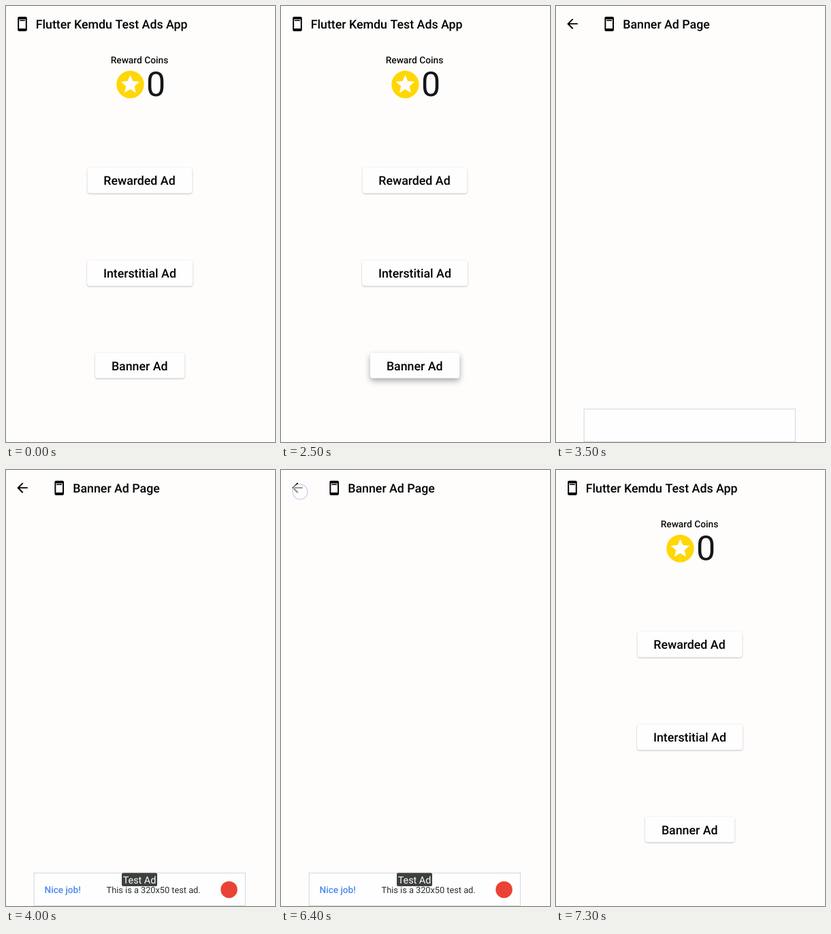
These frames come from a looping animation (395 by 639 pixels, 7700 ms). An HTML page:

```html
<!DOCTYPE html>
<html lang="en">
<head>
<meta charset="utf-8">
<title>Test Ads App</title>
<style>
  html, body { margin: 0; width: 100%; height: 100%; overflow: hidden; background: #fefdfc; }
  svg { display: block; width: 100vw; height: 100vh; font-family: Roboto, sans-serif; text-rendering: geometricPrecision; }
  .bg { fill: #fefdfc; }
  .title, .button text { font-size: 17.75px; font-weight: 500; fill: #000; }
  .button text, .center { text-anchor: middle; }
  .end { text-anchor: end; }
  .button rect {
    fill: #fffefe;
    filter: drop-shadow(0 1px 1px rgba(0, 0, 0, .22)) drop-shadow(0 0 1px rgba(0, 0, 0, .05));
  }
  .coins { font-size: 13.75px; font-weight: 500; fill: #0c0d0e; }
  .count { font-size: 50px; fill: #151618; }

  .press, .page, .ad, .creative, .ripple { animation: 7700ms step-end infinite; }

  .button .press { animation-name: press; }
  @keyframes press {
    29.87% { filter: drop-shadow(0 2px 2px rgba(0, 0, 0, .26)) drop-shadow(0 0 1px rgba(0, 0, 0, .05)); }
    31.16% { filter: drop-shadow(0 3px 3px rgba(0, 0, 0, .28)) drop-shadow(0 0 1px rgba(0, 0, 0, .05)); }
    32.46% { filter: drop-shadow(0 4px 4px rgba(0, 0, 0, .32)) drop-shadow(0 0 1px rgba(0, 0, 0, .05)); }
    36.36% { filter: drop-shadow(0 1px 1px rgba(0, 0, 0, .22)) drop-shadow(0 0 1px rgba(0, 0, 0, .05)); }
  }

  .page { opacity: 0; animation-name: page; }
  @keyframes page {
    0% { opacity: 0; }
    35.06% { opacity: .55; }
    36.36% { opacity: 1; }
    85.71% { opacity: .7; }
    87.01% { opacity: .25; }
    88.31%, 100% { opacity: 0; }
  }

  .ad { opacity: 0; animation-name: ad; }
  @keyframes ad {
    0% { opacity: 0; }
    45.45%, 100% { opacity: 1; }
  }

  .creative { opacity: 0; animation-name: creative; }
  @keyframes creative {
    0% { opacity: 0; }
    48.05% { opacity: .4; }
    49.35% { opacity: .8; }
    50.64%, 100% { opacity: 1; }
  }

  .ripple {
    opacity: 0;
    fill: rgba(254, 253, 255, .55);
    stroke: #d5d3ea;
    stroke-width: 1.4;
    animation-name: ripple;
  }
  @keyframes ripple {
    0% { opacity: 0; r: 11px; }
    83.11% { opacity: 1; r: 11px; }
    84.41% { opacity: .5; r: 17px; }
    85.71%, 100% { opacity: 0; r: 20px; }
  }
</style>
</head>
<body>
<svg viewBox="0 0 395 639" preserveAspectRatio="none">
  <defs>
    <path id="phone" transform="translate(-11.64 -11.64) scale(.97)" fill-rule="evenodd"
      d="M17 1H7c-1.1 0-2 .9-2 2v18c0 1.1.9 2 2 2h10c1.1 0 2-.9 2-2V3c0-1.1-.9-2-2-2zm0 18H7V5h10v14zM8 6h8v1.5H8z"/>
  </defs>

  <rect class="bg" width="395" height="639"/>
  <use href="#phone" x="24" y="26.3"/>
  <text class="title" x="43.8" y="32.9">Flutter Kemdu</text>
  <text class="title end" x="266.4" y="32.9">Test Ads App</text>

  <text class="coins center" x="196" y="83.5">Reward Coins</text>
  <path fill="#ffd704" transform="translate(158.2 90.8) scale(2.02)"
    d="M12 2a10 10 0 1 0 0 20a10 10 0 1 0 0-20zm4.23 16L12 15.45 7.77 18l1.12-4.81-3.73-3.23 4.92-.42L12 5l1.92 4.53 4.92.42-3.73 3.23L16.23 18z"/>
  <text class="count center" x="220" y="132.2">0</text>

  <g class="button">
    <rect x="119.7" y="237" width="153.6" height="37.4" rx="4"/>
    <text x="196" y="262.4">Rewarded Ad</text>
  </g>
  <g class="button">
    <rect x="119" y="372.8" width="155.2" height="37.4" rx="4"/>
    <text x="196.4" y="398.2">Interstitial Ad</text>
  </g>
  <g class="button">
    <rect class="press" x="130.8" y="508.2" width="131.4" height="37.4" rx="4"/>
    <text x="196.2" y="533.5">Banner Ad</text>
  </g>

  <g class="page">
    <rect class="bg" width="395" height="639"/>
    <path transform="translate(12.4 14.5) scale(.97)"
      d="M20 11H7.83l5.59-5.59L12 4l-8 8 8 8 1.41-1.41L7.83 13H20z"/>
    <circle class="ripple" cx="28" cy="32" r="11"/>
    <use href="#phone" x="78.2" y="26.3"/>
    <text class="title" x="98.3" y="32.9">Banner Ad Page</text>

    <g class="ad">
      <rect x="41.2" y="590.7" width="310.2" height="47.9" fill="#fefefe" stroke="#cfd8df"/>
      <g class="creative">
        <text x="56.5" y="619.8" font-size="13.6" font-weight="500" fill="#4a8af0">Nice job!</text>
        <text x="147.6" y="619.8" font-size="12.75" fill="#2b2c2e">This is a 320x50 test ad.</text>
        <circle cx="327.5" cy="615" r="12.3" fill="#ea4335"/>
        <rect x="170" y="590.6" width="52" height="19.5" rx="2" fill="#3d413e"/>
        <text class="center" x="196" y="606.3" font-size="14.4" fill="#fff">Test Ad</text>
      </g>
    </g>
  </g>
</svg>
</body>
</html>
```
